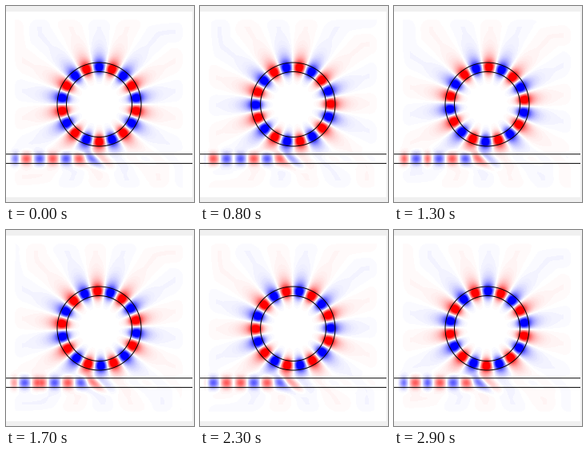
Recreate the animation shown at these times as a matplotlib script. Size 235 px wide and 246 px high, loop 3 s.

```python
import numpy as np
import matplotlib.pyplot as plt
from matplotlib.animation import FuncAnimation
from matplotlib.colors import LinearSegmentedColormap
from matplotlib.patches import Circle

W, H, DPI = 235, 246, 100
FRAMES, INTERVAL = 30, 100
LINE = 72 / DPI

# Geometry in pixels, y pointing down
LEFT, RIGHT, TOP, BOTTOM = 0, 233, 7, 240
CX, CY = 116.5, 123.5
R_IN, R_OUT = 41, 52.5
GUIDE_TOP, GUIDE_BOTTOM = 185.9, 197.6
GUIDE_Y = (GUIDE_TOP + GUIDE_BOTTOM) / 2
SOURCE_X = 42

MODE = 9               # azimuthal order of the ring mode
K_AIR = 0.095          # free-space wavenumber
K_GUIDE = 2 * np.pi / 33
PEAK, RIM = 1.4, 0.85  # field in the core and at its walls


def sigmoid(u):
    return 1 / (1 + np.exp(-u))


def ring_radial(r):
    """Amplitude and phase lag of the whispering-gallery mode along r."""
    mid, half = (R_IN + R_OUT) / 2, (R_OUT - R_IN) / 2
    core = PEAK - (PEAK - RIM) * ((r - mid) / half) ** 2
    inner = RIM * (r / R_IN) ** MODE

    def decay(radius):
        x = np.clip(K_AIR * radius, 0.1, MODE)
        return MODE * np.arccosh(MODE / x) - np.sqrt(MODE**2 - x**2)

    outer = RIM * np.exp(decay(r) - decay(R_OUT))
    amp = np.where(r < R_IN, inner, np.where(r < R_OUT, core, outer))

    # beyond the caustic the evanescent lobes turn into outgoing spirals
    x = np.maximum(K_AIR * r, MODE)
    lag = np.sqrt(x**2 - MODE**2) - MODE * np.arccos(MODE / x) - np.pi / 4
    return amp, np.maximum(lag, 0)


def ring_mode(x, y):
    r = np.hypot(x - CX, y - CY)
    theta = np.arctan2(CX - x, CY - y)
    amp, lag = ring_radial(r)
    margin = np.minimum(np.minimum(x - 6, 226 - x),
                        np.minimum(y - 12, 233 - y))
    amp = amp * np.clip(margin / 14, 0, 1)
    amp = amp * (1 - 0.85 * np.exp(-((y - GUIDE_Y) / 9) ** 2))
    return -amp * np.exp(1j * (MODE * theta + lag))


def guide_mode(x, y):
    dy = y - GUIDE_Y
    lean = sigmoid((x - 104) / 5)      # wavefronts tilt under the ring
    xs = x - lean * dy
    width = 5.5 + 1.5 * lean
    amp = 0.62 * sigmoid((116 - xs) / 6) + 0.025
    amp = amp * np.exp(-(dy / width) ** 2 / 1.7)
    amp = amp * np.clip((x - 4) / 9, 0, 1) * np.clip((224 - x) / 10, 0, 1)
    return -amp * np.exp(1j * K_GUIDE * np.abs(xs - SOURCE_X))


gx, gy = np.meshgrid(np.arange(LEFT, RIGHT) + 0.5,
                     np.arange(TOP, BOTTOM) + 0.5)
field = ring_mode(gx, gy) + guide_mode(gx, gy)


def snapshot(i):
    wave = (field * np.exp(-2j * np.pi * i / FRAMES)).real
    return np.round(np.clip(wave, -1, 1) * 48) / 48


fig = plt.figure(figsize=(W / DPI, H / DPI), dpi=DPI, facecolor="#f0f0f0")
ax = fig.add_axes([0, 0, 1, 1])
ax.axis("off")

bluered = LinearSegmentedColormap.from_list(
    "bluered", ["#0000ff", "#ffffff", "#ff0000"], N=511)
img = ax.imshow(snapshot(0), cmap=bluered, vmin=-1, vmax=1,
                extent=(LEFT, RIGHT, BOTTOM, TOP),
                interpolation="nearest", aspect="auto")

for radius in (R_IN, R_OUT):
    ax.add_patch(Circle((CX, CY), radius, fill=False, ec="black", lw=LINE))
for wall in (GUIDE_TOP, GUIDE_BOTTOM):
    ax.plot([LEFT, RIGHT], [wall, wall], color="black", lw=LINE,
            solid_capstyle="butt", snap=False)

ax.set_xlim(0, W)
ax.set_ylim(H, 0)


def update(i):
    img.set_data(snapshot(i))
    return [img]


anim = FuncAnimation(fig, update, frames=FRAMES, interval=INTERVAL,
                     repeat=True, repeat_delay=0)
plt.show()
```
